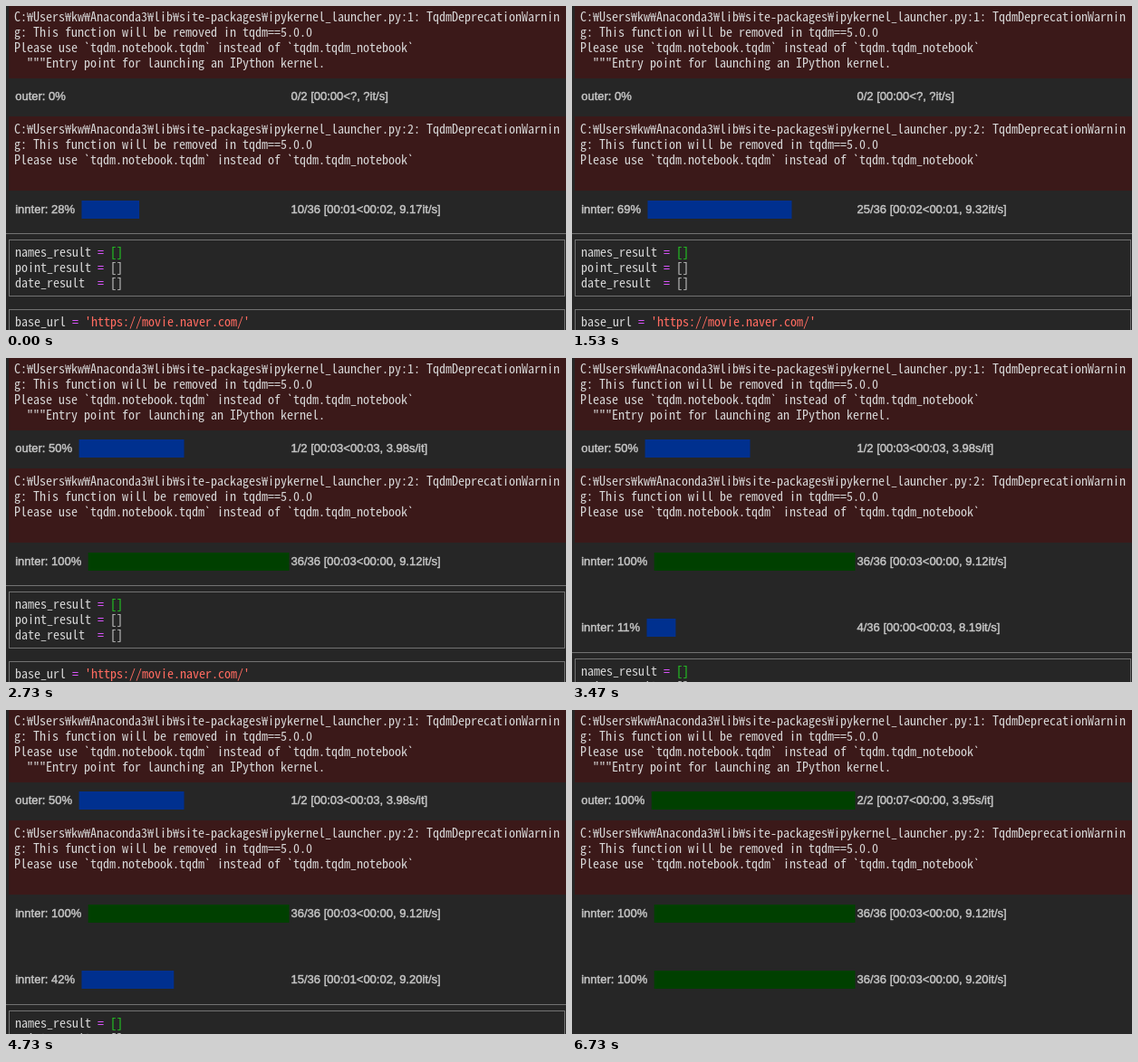
An HTML page with a canvas that plays this animation: 618 by 358 pixels, repeating every 6930 ms.

```html
<!DOCTYPE html>
<html lang="en">
<head>
<meta charset="utf-8">
<title>Nested progress bars</title>
<style>
  html, body { margin: 0; width: 100%; height: 100%; overflow: hidden; background: #262626; }
  canvas { display: block; }
</style>
</head>
<body>
<canvas id="stage" width="618" height="358"></canvas>
<script>
const ctx = document.getElementById('stage').getContext('2d');
const LOOP = 6930, HALF = 2730, SECOND = 2930, DONE = 6730;
const TOTAL = 36, CELL = 7, BAR_END = 312.5;
const BG = '#262626', ERROR_BG = '#3b1919', RULE = '#727272', LABEL = '#c6c6c6';
const CODE = '#d6d6d6', OPERATOR = '#dd55ff', MATCH = '#22dd22', STRING = '#ff6b60';
const BLUE = '#00308f', GREEN = '#004000';
const MONO = '"Noto Sans Mono CJK KR", "Noto Sans Mono", monospace';
const SANS = '13px "Liberation Sans", Arial, sans-serif';

// One entry per finished iteration; repeated times advance by two.
const firstTicks = [200, 200, 330, 470, 600, 600, 730, 800, 930, 1070, 1130, 1270,
  1330, 1530, 1530, 1670, 1730, 1870, 2000, 2130, 2200, 2330, 2400, 2530, 2600, 2730];
const secondTicks = [3070, 3200, 3330, 3470, 3600, 3730, 3870, 3930, 4070, 4200, 4330,
  4470, 4600, 4730, 4730, 4870, 5000, 5130, 5130, 5270, 5330, 5470, 5600, 5730, 5730,
  5800, 5930, 6070, 6130, 6330, 6330, 6470, 6530, 6730, 6730, 6730];

const lerp = (a, b, k) => a + (b - a) * Math.min(1, Math.max(0, k));
const passed = (ticks, t) => ticks.filter(x => x <= t).length;
const clock = s => '00:' + String(Math.floor(s)).padStart(2, '0');

// Half-width cells of exactly 7px, whichever monospaced font is present.
ctx.font = `14px ${MONO}`;
const monoFont = `${14 * CELL / ctx.measureText('0').width}px ${MONO}`;

function rect(x, y, w, h, color) {
  ctx.fillStyle = color;
  ctx.fillRect(x, y, w, h);
}

function mono(text, x, y, color = CODE) {
  ctx.font = monoFont;
  ctx.textAlign = 'center';
  ctx.fillStyle = color;
  [...text].forEach((ch, i) => ctx.fillText(ch, x + (i + 0.5) * CELL, y));
}

function sans(text, x, y) {
  ctx.font = SANS;
  ctx.textAlign = 'left';
  ctx.fillStyle = ctx.strokeStyle = LABEL;
  ctx.lineWidth = 0.45;
  ctx.fillText(text, x, y);
  ctx.strokeText(text, x, y);
  return ctx.measureText(text).width;
}

function progress(name, y, n, total, stats, barCount = n) {
  const percent = Math.round(100 * n / total);
  const x = 10.2 + sans(`${name}: ${percent}%`, 10.2, y + 14) + 7.5;
  const share = Math.min(1, barCount / total);
  rect(x, y, (BAR_END - x) * share, 20, n === total ? GREEN : BLUE);
  sans(`${n}/${total} [${stats}]`, 314.5, y + 14);
}

function inner(y, n, rate, barCount) {
  const stats = n
    ? `${clock(n / rate)}<${clock((TOTAL - n) / rate)}, ${rate.toFixed(2)}it/s`
    : '00:00<?, ?it/s';
  progress('innter', y, n, TOTAL, stats, barCount);
}

function outer(t) {
  if (t < HALF) progress('outer', 90, 0, 2, '00:00<?, ?it/s');
  else if (t < DONE) progress('outer', 90, 1, 2, '00:03<00:03, 3.98s/it');
  else progress('outer', 90, 2, 2, '00:07<00:00, 3.95s/it');
}

function warning(y, height, line, textY, extra = '') {
  rect(3, y, 615, height, ERROR_BG);
  [
    `C:₩Users₩kw₩Anaconda3₩lib₩site-packages₩ipykernel_launcher.py:${line}: TqdmDeprecationWarnin`,
    'g: This function will be removed in tqdm==5.0.0',
    'Please use `tqdm.notebook.tqdm` instead of `tqdm.tqdm_notebook`',
    extra
  ].forEach((text, i) => mono(text, 9, textY + 17 * i));
}

function assign(name, value, y, color) {
  mono(name, 10, y);
  mono('=', 10 + CELL * (name.length + 1), y, OPERATOR);
  mono(value, 10 + CELL * (name.length + 3), y, color);
}

function codeCells(dy) {
  rect(0, 251 + dy, 618, 1, RULE);
  ctx.strokeStyle = RULE;
  ctx.lineWidth = 1;
  ctx.strokeRect(3.5, 258.5 + dy, 613, 62);
  ctx.strokeRect(3.5, 335.5 + dy, 613, 40);
  assign('names_result', '[]', 277 + dy, MATCH);
  assign('point_result', '[]', 294 + dy);
  assign('date_result ', '[]', 311 + dy);
  assign('base_url', "'https://movie.naver.com/'", 354 + dy, STRING);
}

function draw(t) {
  rect(0, 0, 618, 358, BG);
  warning(0, 80, 1, 17, '  """Entry point for launching an IPython kernel.');
  warning(122, 82, 2, 141);
  outer(t);

  const a = 10 + passed(firstTicks, t);
  inner(215, a, a < 25 ? lerp(9.17, 9.32, (a - 10) / 15) : lerp(9.32, 9.12, (a - 25) / 11));

  if (t >= SECOND) {
    const b = passed(secondTicks, t);
    inner(288, b, lerp(8.19, 9.2, (b - 4) / 11), b && b + 1);
  }
  if (t < DONE) codeCells(t < SECOND ? 0 : 74);
}

const start = performance.now();
function frame() {
  draw((performance.now() - start) % LOOP);
  requestAnimationFrame(frame);
}
frame();
</script>
</body>
</html>
```
